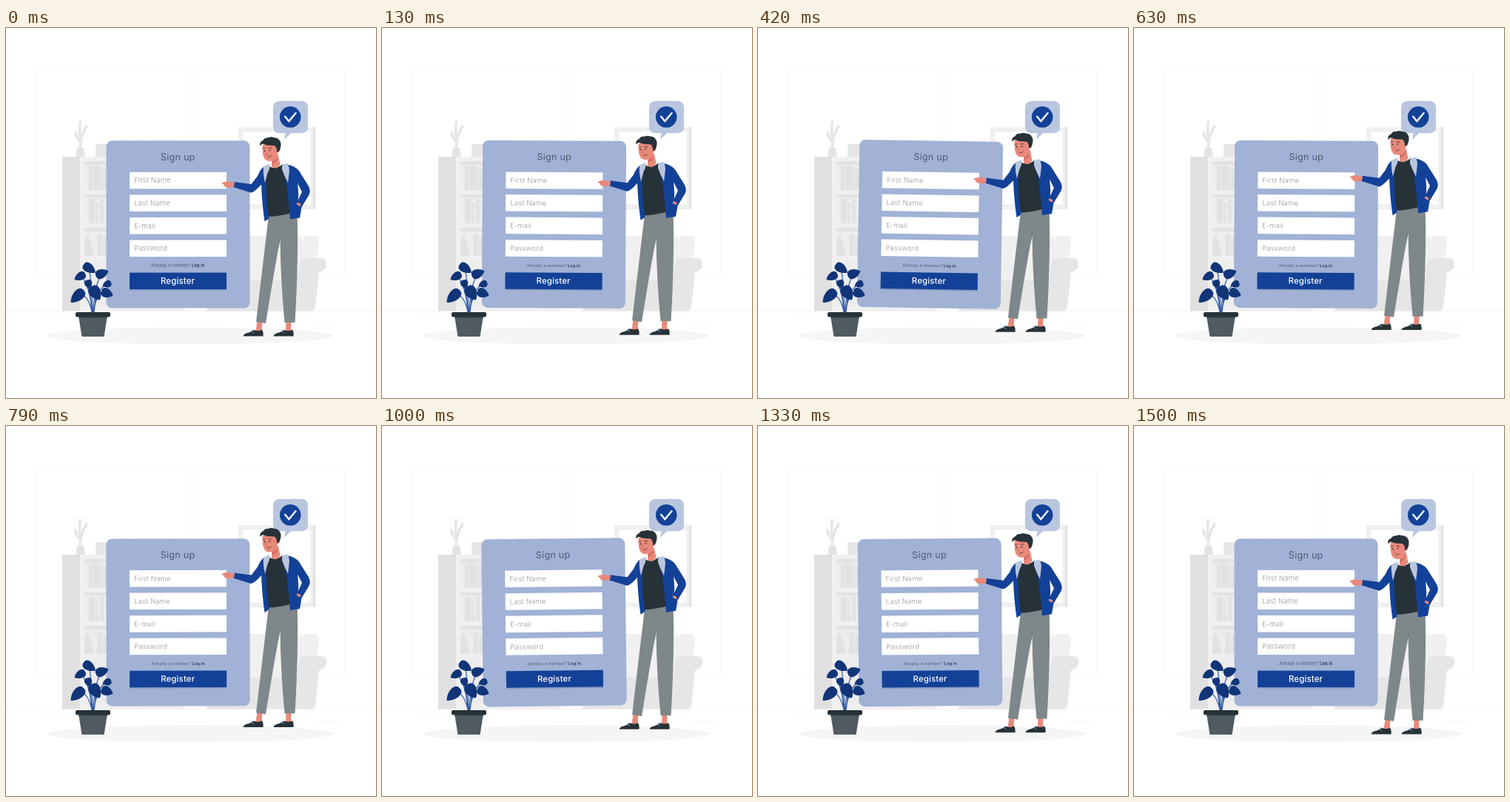
An HTML page for the animation above (1540 ms loop, 500 px wide and 500 px high).

```html
<!DOCTYPE html>
<html lang="en">
<head>
<meta charset="utf-8">
<title>Sign up</title>
<style>
  html, body { margin: 0; width: 100%; height: 100%; overflow: hidden; background: #fff; }
  svg { display: block; width: 100vw; height: 100vh; }
  text { font-family: Inter, "Open Sans", sans-serif; }
  .skin { fill: #e8897b; }
  .dark { fill: #263238; }
  .blue { fill: #134197; }
  .pale { fill: #b9c6e0; }
  .label { font-size: 9.5px; font-weight: 300; letter-spacing: .2px; fill: #98989d; }
  .line { fill: none; stroke-linecap: round; stroke-linejoin: round; }
</style>
</head>
<body>
<svg viewBox="0 0 500 500">
  <g id="room">
    <g fill="none" stroke="#f5f5f5" stroke-width=".8">
      <rect x="39.5" y="55.2" width="203" height="282" rx="2"/>
      <rect x="255" y="55.2" width="203" height="282" rx="2"/>
    </g>
    <path d="M0 382.5H500" stroke="#ebebeb" stroke-width=".5"/>
    <path d="M416 398.5H449M396 390.5H416M52 390.5H92" stroke="#f2f2f2" stroke-width=".6"/>

    <g fill="#e6e6e6">
      <path d="M94.500 174L96 162Q100.500 159 105 162L107 174Z" fill="#e3e3e3"/>
      <path class="line" d="M100.500 161Q99 143 100 127M100 152Q94 148 94 141M101 155Q103 140 109 133" stroke="#e6e6e6" stroke-width="3.600"/>
      <path d="M121 157H152V174H121ZM153 152H160V174H153ZM166 153L172 152V174H166ZM181 152H189V174H181ZM196 153L203 151.500V174H196ZM211 152H232V174H211Z"/>
    </g>
    <rect x="76" y="174" width="25" height="208.500" fill="#e0e0e0"/>
    <rect x="100" y="174" width="142" height="208.500" fill="#f0f0f0"/>
    <g fill="#ededed">
      <rect x="106" y="180" width="130" height="39"/>
      <rect x="106" y="225" width="130" height="39"/>
      <rect x="106" y="270" width="130" height="38"/>
      <rect x="106" y="314" width="130" height="62"/>
    </g>
    <path fill="#e2e2e2" d="M106 180H136V185H106ZM112 187H117V219H112ZM118 185H125V219H118ZM126 187H130V219H126ZM131 190H136V219H131ZM106 225H136V229H106ZM112 231H121V264H112ZM122 236H125V264H122ZM127 231H132V264H127ZM106 270H136V275H106ZM106 282L111 279L119 306L114 308H106ZM123 279H130V308H123ZM131 282H136V308H131Z"/>

    <rect x="314" y="134" width="104" height="110.500" fill="#e0e0e0"/>
    <rect x="314" y="134" width="101" height="110.500" fill="#f0f0f0"/>
    <rect x="319.500" y="139.500" width="92" height="99" fill="#fff"/>
    <path d="M319.500 238.500V139.500H411.500" fill="none" stroke="#ebebeb" stroke-width=".8"/>

    <path fill="#f0f0f0" d="M280 382V288Q280 281 287 281H394Q402 281 401 290L398 345H280Z"/>
    <path fill="#f0f0f0" d="M402 281H417Q424 281 423 289L420 320H398Z"/>
    <path fill="#e6e6e6" d="M271 340H405V382.500H271Z"/>
    <path fill="#e6e6e6" d="M403 311H426Q433 311 433 319T425 330H423L418 378Q417 382.500 412 382.500H388L396 320Q397 311 403 311Z"/>
    <ellipse cx="249.500" cy="416" rx="193.500" ry="11.300" fill="#f5f5f5"/>
  </g>

  <g id="panel">
    <rect x="135.500" y="152.300" width="194" height="226.200" rx="8" fill="#a1b2d6"/>
    <text x="208.800" y="178.500" font-size="12.600" letter-spacing=".25" fill="#4c5a72">Sign up</text>
    <g id="fields"></g>
    <text x="196" y="323" font-size="5.600" letter-spacing=".15" fill="#4c5a72">Already a member?</text>
    <text x="251.300" y="323" font-size="5.600" letter-spacing=".1" font-weight="700" fill="#35435c">Log in</text>
    <rect x="167" y="332" width="131" height="22.700" fill="#8a9abf"/>
    <rect class="blue" x="167" y="330.600" width="131" height="22.500"/>
    <text x="209" y="345.500" font-size="11.400" letter-spacing=".15" font-weight="500" fill="#fff">Register</text>
  </g>

  <g id="plant">
    <path class="line" d="M117 384Q116 350 113 328M118 384Q119 350 128 334M116 384Q114 352 103 337M116 384Q115 362 111 348M119 384Q121 358 134 347M116 384Q112 362 99 358M119 384Q121 372 121 358M119 384Q120 362 133 356" stroke="#2f59a8" stroke-width="1.200"/>
    <g id="leaves" fill="#113578"></g>
    <path fill="#4f5b60" d="M98 389H137L132.500 417H102.500Z"/>
    <rect class="dark" x="94" y="384" width="47" height="6.500" rx="2"/>
    <path fill="#37454b" d="M98.200 390.500H136.800L136.500 392H98.500Z"/>
  </g>

  <g id="bubble">
    <path class="pale" stroke="#a9b7d6" stroke-width=".5" d="M370 99H399Q407.700 99 407.700 107.800V133Q407.700 141.700 399 141.700H385L376.500 150L378 141.700H370Q361.300 141.700 361.300 133V107.800Q361.300 99 370 99Z"/>
    <circle class="blue" cx="384.200" cy="120.300" r="14.300"/>
    <path class="line" d="M377.200 119.800L382.300 126L391.500 115" stroke="#fff" stroke-width="2.400"/>
  </g>

  <g id="man">
    <path class="skin" d="M339.500 396H346.500L345.500 410H337.500ZM378.500 396H385.500L385 410H378Z"/>
    <g id="shoe">
      <path class="dark" d="M320.500 416.400Q321 412.800 329 411.300L335.500 408Q341 410.500 346 407.800Q348.200 411 347.500 416.400Z"/>
      <path class="line" d="M332 410.300L335 412M334.500 408.300Q331 406.800 332.500 409.500" stroke="#7f98c9" stroke-width=".8"/>
    </g>
    <use href="#shoe" x="41"/>
    <path fill="#7e8789" d="M355 253L393.500 249Q395.500 310 390.500 398L376.500 398Q371 340 370.500 285Q362 330 351 399L338 397Q347 320 355 253Z"/>
    <path fill="#667073" d="M371 276L367.500 300Q369 294 370.500 285Z"/>

    <path class="dark" d="M356 187Q364 192 374 184L380 189L386 250Q367 255 352 255L348 200Z"/>
    <path class="blue" d="M349 187Q344 190 340 200L331.500 211L308.500 208L307 215L331 222.500Q335 222.500 345 211.500Q346 238 349.500 261.500L355.500 257.500Q350 226 352 194Z"/>
    <path class="blue" fill-rule="evenodd" d="M380 184.500Q391 186.500 396 193L408.500 213Q412.500 219.500 409.500 225.500L399.500 242L397 256.500L384 258.500Q381.500 225 377 197ZM394 210Q396 228 394.500 233L400 221.500Z"/>
    <path class="skin" d="M392.500 236.500Q395 235 398.500 238L397.500 241L393.500 239Z"/>
    <path class="pale" d="M348 187L356 183.500Q358 188 353.500 196L350 209Q347 198 348 187ZM373 185L380 182.500Q384 188 382.500 197L381 209Q376 200 373 191Z"/>
    <path class="skin" d="M309 209L301 207.300Q295 207.300 291.500 209.300Q292 211.300 294.500 211.700Q294 213.700 297 215Q302 216.700 308 214.700Z"/>

    <path class="skin" d="M359 175L367.500 170L370.500 184Q366 193 359 187.500Z"/>
    <path d="M359.500 180Q364 179 367 174Q367 181 360 184Z" fill="#cf7167"/>
    <path class="skin" d="M346.500 158Q346 172 349.500 177Q353.500 181.500 360 179Q365 176 366.500 169Q370.500 168 370 163Q368 155 363 154Z"/>
    <path class="dark" d="M343.300 159Q342.500 153.500 347 152Q350 147.500 354.500 148.300Q358 146.500 362 148Q369 148 371.300 155Q372.300 161 369 166.500L366 168Q366.500 162 363 159Q353 159 346.500 156.500Z"/>
    <g class="dark">
      <ellipse cx="349.500" cy="166" rx=".8" ry="1.100"/>
      <ellipse cx="356.500" cy="165.500" rx=".8" ry="1.100"/>
    </g>
    <path class="line" d="M347.500 163L350 162.300M355 162.300Q357 161.300 359 162.500" stroke="#263238" stroke-width=".8"/>
    <path class="line" d="M352.500 166.500L351 170.800L353 171.100" stroke="#c9655c" stroke-width=".7"/>
    <path class="line" d="M353.500 174Q356.500 174.800 358.500 172.500" stroke="#263238" stroke-width=".7"/>
  </g>
</svg>
<script>
const $ = id => document.getElementById(id);

$('fields').innerHTML = ['First Name', 'Last Name', 'E-mail', 'Password'].map((name, i) => {
  const y = 194.8 + i * 30.6;
  return `<rect x="167" y="${y}" width="131" height="22.5" fill="#fff"/>
    <text class="label" x="173" y="${y + 14.6}">${name}</text>`;
}).join('');

// base x, base y, tip x, tip y, half width
const leaves = [
  [105, 319.5, 121, 330.5, 8], [121.5, 335, 138.5, 328.5, 8], [107, 332, 92.5, 340, 7],
  [110, 340.5, 113, 352, 6.5], [142, 344, 130.5, 348.5, 6], [105, 354.5, 87.5, 371, 9],
  [115.5, 349.5, 127, 367.5, 10], [129, 355.5, 144.5, 361.5, 8]
];
$('leaves').innerHTML = leaves.map(([x, y, tx, ty, w]) => {
  const len = Math.hypot(tx - x, ty - y);
  const turn = Math.atan2(ty - y, tx - x) * 180 / Math.PI;
  const near = -.05 * len, far = .65 * len, wide = w * 1.12;
  return `<path transform="translate(${x} ${y}) rotate(${turn})"
    d="M0 0C${near} ${-wide} ${far} ${-w} ${len} 0C${far} ${w} ${near} ${wide} 0 0Z"/>`;
}).join('');

const LOOP = 1540, CYCLE = 1500, STEP = 1000 / 24;
const wave = p => 1 - Math.abs(1 - 2 * p);
const sway = p => p < .25 ? 4 * p : p < .75 ? 2 - 4 * p : 4 * p - 4;

function draw(now) {
  const step = Math.floor((now % LOOP + 4) / STEP);
  const p = step * STEP / CYCLE % 1;
  $('man').setAttribute('transform', `translate(0 ${-10 * wave(p)})`);
  $('panel').setAttribute('transform', `rotate(${sway(p)} 232.5 265.5)`);
}

const start = performance.now();
(function tick() {
  draw(performance.now() - start);
  requestAnimationFrame(tick);
})();
</script>
</body>
</html>
```
